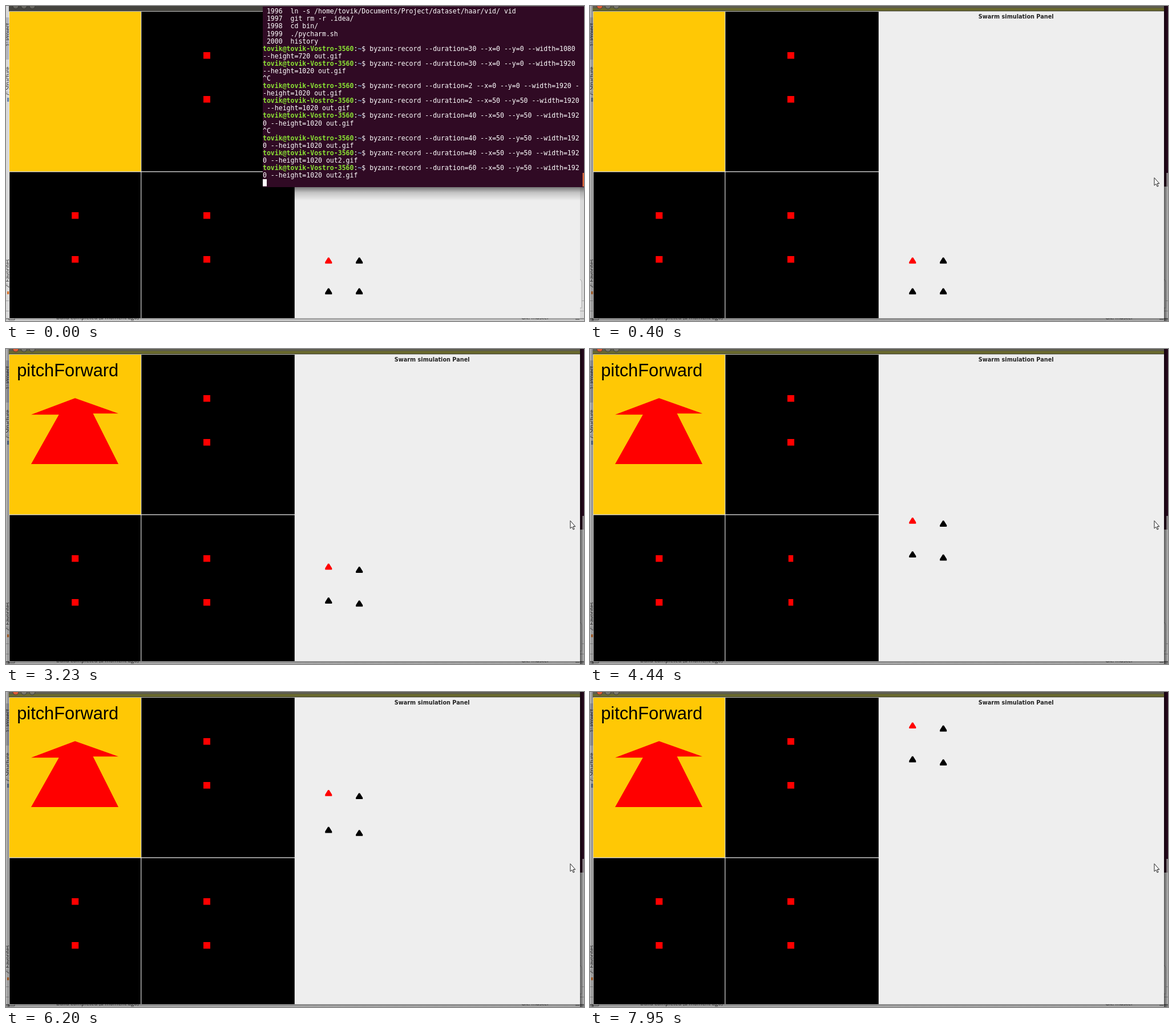
Recreate the animation shown at these times as an HTML page. Size 1013 by 553 pixels, loop 8000 ms.

```html
<!DOCTYPE html>
<html lang="en">
<head>
<meta charset="utf-8">
<title>Swarm simulation</title>
<style>
  html, body { margin: 0; width: 100%; height: 100%; overflow: hidden; background: #d6d6d6; }
  svg { display: block; width: 100%; height: 100%; }
  text { white-space: pre; }
  .ide { font: 9.5px "Open Sans", sans-serif; fill: #1c1c1c; }
  .title { font: bold 9.7px "DejaVu Sans", sans-serif; fill: #222; }
  .command { font: 30.8px "Liberation Sans", Arial, sans-serif; fill: #000; }
  .shell { font: 11.52px "DejaVu Sans Mono", monospace; fill: #fff; }
  .user { font-weight: bold; fill: #8ae234; }
  .dir { font-weight: bold; fill: #729fcf; }
</style>
</head>
<body>
<svg viewBox="0 0 1013 553" preserveAspectRatio="none">
  <defs>
    <linearGradient id="shadeLeft"><stop offset="0" stop-opacity=".12"/><stop offset="1" stop-opacity=".45"/></linearGradient>
    <linearGradient id="shadeRight"><stop offset="0" stop-opacity=".6"/><stop offset="1" stop-opacity=".15"/></linearGradient>
    <linearGradient id="shadeDown" x2="0" y2="1"><stop offset="0" stop-opacity=".5"/><stop offset=".4" stop-opacity=".18"/><stop offset="1" stop-opacity="0"/></linearGradient>
    <path id="bot" d="M-1 -5.5H1L6 2.5V5.2H-6V2.5Z"/>
  </defs>

  <g id="desktop">
    <rect width="1013" height="553" fill="#d9d9d9"/>
    <rect y="20" width="6" height="74" fill="#b4b6bd"/>
    <path d="M0 517.5H6M0 535.5H6M1006 517.5H1013M1006 535.5H1013" stroke="#a2a2a2"/>
    <path d="M1006 480Q1009 481 1009 485V530H1006" fill="#ededed" stroke="#aaa"/>
    <g class="ide">
      <text transform="translate(6 71) rotate(-90)">1: Project</text>
      <text transform="translate(6 158) rotate(-90)">7: Structure</text>
      <text transform="translate(6 495) rotate(-90)">2: Favorites</text>
      <text x="88" y="549.5">Build completed (a moment ago)</text>
      <text x="903" y="549.5">Git: master</text>
    </g>
    <rect x="2" y="161" width="4" height="7" fill="#6f86a8"/>
    <rect x="2" y="501" width="4" height="5" fill="#d8742c"/>
    <path d="M5 549V551H15V549M998 550H1005" fill="none" stroke="#555"/>
    <rect y="548" width="1013" height="5" fill="url(#shadeDown)"/>
  </g>

  <g id="activeShade">
    <rect x="1006" width="7" height="317" fill="#300a24"/>
    <rect x="1010" y="293" width="3" height="24" fill="#aaa0a6"/>
    <rect width="6" height="553" fill="url(#shadeLeft)"/>
    <rect x="1006" width="7" height="553" fill="url(#shadeRight)"/>
    <rect y="548" width="1013" height="5" fill="#000" opacity=".18"/>
  </g>

  <g id="window">
    <rect x="5" width="1001" height="10" fill="#45443f"/>
    <g fill="#67655f" stroke="#34332f">
      <circle cx="17" r="5"/><circle cx="31.5" r="5"/><circle cx="46" r="5"/>
    </g>
    <g id="activeBar">
      <rect x="5" width="1001" height="4" fill="#5d5c50"/>
      <rect x="5" y="3.5" width="1001" height="5" fill="#69692d"/>
      <circle cx="17" r="5" fill="#dc5b35" stroke="#55382c"/>
      <g fill="#77756c" stroke="#3c3b36"><circle cx="31.5" r="5"/><circle cx="46" r="5"/></g>
      <rect x="5" y="8.3" width="1001" height="1" fill="#3f3f26"/>
    </g>
    <rect x="5.3" y="9.3" width="1000.7" height="539" fill="#eee"/>
    <rect x="6" y="10" width="230.3" height="280.3" fill="#ffc805"/>
    <path d="M237.3 10H505.8V290.2H237.3ZM6.2 291.4H236.2V548H6.2ZM237.3 291.4H505.8V548H237.3Z"/>
    <g id="squares" fill="#f00"></g>
    <g id="order" visibility="hidden">
      <text class="command" x="19.2" y="47.5">pitchForward</text>
      <path d="M121 86.3L197 113.3H152.5L197 202H44L92.7 115.3H44Z" fill="#f00"/>
    </g>
    <text class="title" x="746.7" y="22.3" text-anchor="middle">Swarm simulation Panel</text>
    <g id="bots"></g>
  </g>

  <path id="pointer" d="M989 301.5V315L992 312.3L994.2 317L996 316.2L994 311.6H997.8Z" fill="#fff" stroke="#222"/>

  <g id="terminal">
    <rect x="450" y="318" width="563" height="24" fill="url(#shadeDown)"/>
    <rect x="450" width="563" height="318" fill="#300a24"/>
    <rect x="450" width="563" height="1" fill="#57464f"/>
    <rect x="1010.5" y="293" width="2.5" height="24" fill="#e0693a"/>
    <rect x="450" y="304" width="7" height="12.5" fill="#fff"/>
  </g>
</svg>
<script>
const LOOP = 8000, COLUMNS = 80;
const FADE = { start: 170, end: 400, steps: 5 };
const MARCH = { start: 2275, period: 78.5, step: 5.39, order: 2280 };
const BLINK = 50;

const $ = id => document.getElementById(id);
function add(parent, tag, attrs, content) {
  const node = document.createElementNS("http://www.w3.org/2000/svg", tag);
  for (const key in attrs) node.setAttribute(key, attrs[key]);
  if (content) node.textContent = content;
  parent.append(node);
  return node;
}

// Terminal history, wrapped at the terminal's width
const USER = "tovik", HOST = `${USER}@${USER}-Vostro-3560`, PROMPT = HOST + ":~$ ";
const record = (seconds, offset, width, height, file) =>
  `${PROMPT}byzanz-record --duration=${seconds} --x=${offset} --y=${offset} --width=${width} --height=${height} ${file}.gif`;
const history = [
  ` 1996  ln -s /home/${USER}/Documents/Project/dataset/haar/vid/ vid`,
  " 1997  git rm -r .idea/",
  " 1998  cd bin/",
  " 1999  ./pycharm.sh",
  " 2000  history",
  record(30, 0, 1080, 720, "out"),
  record(30, 0, 1920, 1020, "out"),
  "^C",
  record(2, 0, 1920, 1020, "out"),
  record(2, 50, 1920, 1020, "out"),
  record(40, 50, 1920, 1020, "out"),
  "^C",
  record(40, 50, 1920, 1020, "out"),
  record(40, 50, 1920, 1020, "out2"),
  record(60, 50, 1920, 1020, "out2"),
];
let row = 0;
for (const entry of history) {
  for (let at = 0; at < entry.length; at += COLUMNS) {
    const line = entry.slice(at, at + COLUMNS);
    const text = add($("terminal"), "text", { class: "shell", x: 450, y: 13.3 + 13.08 * row++ });
    if (!line.startsWith(PROMPT)) { text.textContent = line; continue; }
    add(text, "tspan", { class: "user" }, HOST);
    add(text, "tspan", {}, ":");
    add(text, "tspan", { class: "dir" }, "~");
    add(text, "tspan", {}, line.slice(HOST.length + 2));
  }
}

// Each panel's pair of squares narrows for a moment at the listed times
const panels = [
  { x: 352, y: 81, blinks: [3480, 4240, 5090, 5950, 6750, 7600] },
  { x: 352, y: 362, blinks: [3630, 4440, 5240, 6100, 7000, 7750] },
  { x: 121.2, y: 362, blinks: [5350, 6250] },
];
for (const panel of panels)
  panel.squares = [0, 77].map(dy => add($("squares"), "rect", { y: panel.y + dy, height: 11.6 }));

// Followers trail the red leader by a lag counted in steps
const bots = [
  { x: 565.3, y: 447, lag: 0, fill: "#f00" },
  { x: 619.2, y: 447, lag: 0.95, fill: "#000" },
  { x: 565.3, y: 501, lag: 1.05, fill: "#000" },
  { x: 619.2, y: 501, lag: 2.12, fill: "#000" },
];
for (const bot of bots) bot.node = add($("bots"), "use", { href: "#bot", fill: bot.fill });

function terminalOpacity(t) {
  if (t < FADE.start) return 1;
  const gap = (FADE.end - FADE.start) / (FADE.steps - 1);
  const done = Math.floor((t - FADE.start) / gap) + 1;
  return Math.max(0, 1 - done / FADE.steps);
}

function render(t) {
  const opacity = terminalOpacity(t);
  $("terminal").setAttribute("opacity", opacity);
  for (const id of ["activeShade", "activeBar", "pointer"]) $(id).setAttribute("opacity", 1 - opacity);
  $("order").setAttribute("visibility", t >= MARCH.order ? "visible" : "hidden");

  for (const { x, blinks, squares } of panels) {
    const width = blinks.some(b => t >= b && t < b + BLINK) ? 8.4 : 12;
    for (const square of squares) {
      square.setAttribute("x", x - width / 2);
      square.setAttribute("width", width);
    }
  }
  for (const { x, y, lag, node } of bots) {
    const steps = Math.max(0, Math.floor((t - MARCH.start) / MARCH.period - lag));
    node.setAttribute("transform", `translate(${x} ${y - steps * MARCH.step})`);
  }
}

const began = performance.now();
function tick() {
  render((performance.now() - began) % LOOP);
  requestAnimationFrame(tick);
}
tick();
</script>
</body>
</html>
```
